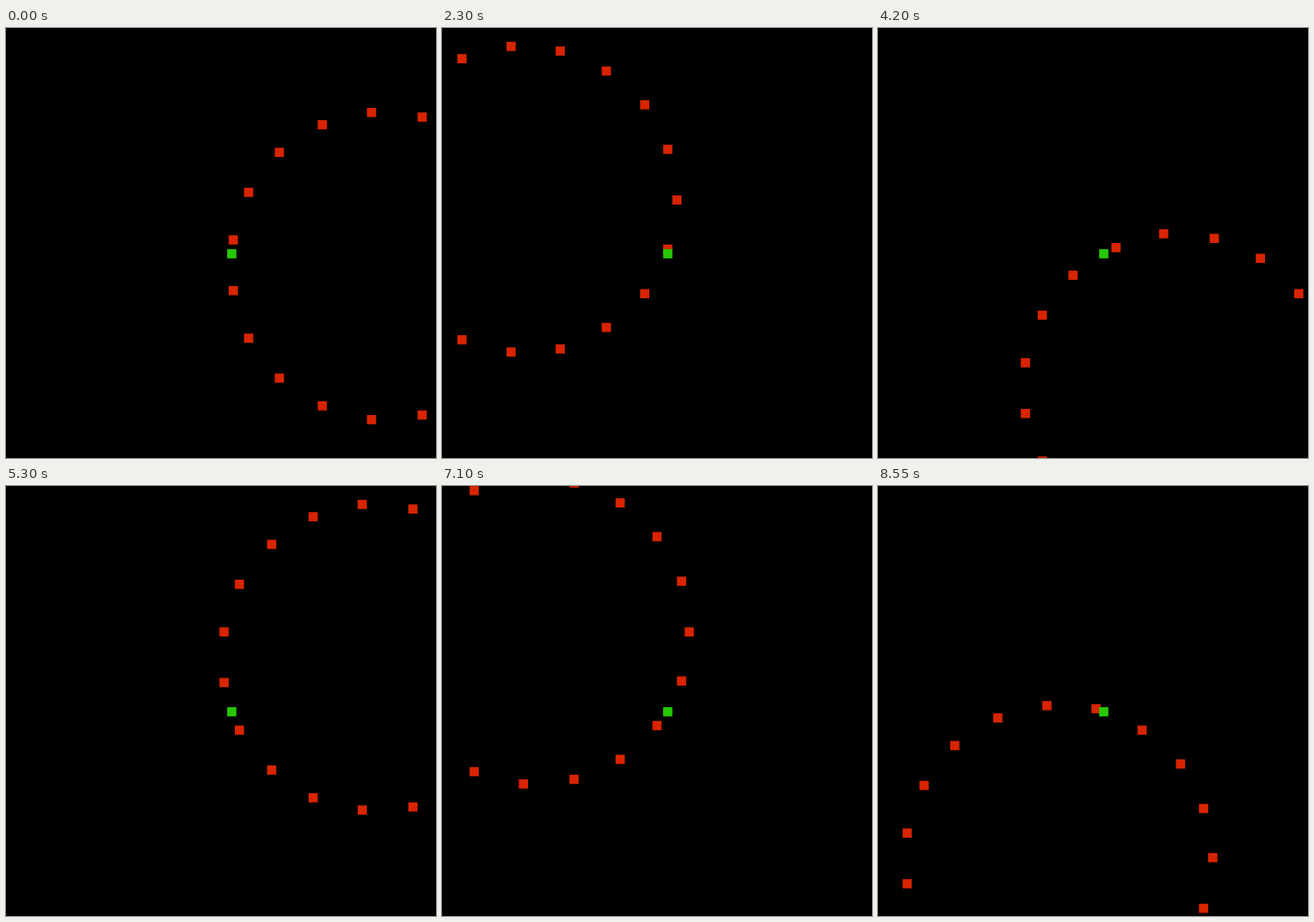
An HTML page with a canvas for the animation above (8600 ms loop, 500x500 px).

```html
<!DOCTYPE html>
<html lang="en">
<head>
<meta charset="utf-8">
<title>Orbiting ring</title>
<style>
  html, body { margin: 0; width: 100%; height: 100%; overflow: hidden; background: #000; }
  canvas { display: block; width: 500px; height: 500px; }
</style>
</head>
<body>
<canvas id="stage" width="500" height="500"></canvas>
<script>
const ctx = document.getElementById('stage').getContext('2d');
const LOOP = 8600, STEP = 50;
const SCALE = 500 / 280;             // the scene is laid out on a 280-unit grid
const PIVOT = 147, RADIUS = 100, DOTS = 19, SIZE = 6;

// [time in ms, angle in degrees] of the ring's centre around the pivot
const turns = [
  [0, 4.8], [900, -57.2], [1100, -70.9], [2300, -159.6], [4200, -298.8],
  [4500, -322.2], [6300, -452.9], [6350, -456], [7200, -515.7],
  [7800, -557.9], [8100, -581.5], [8550, -613.3]
];

function angleAt(time) {
  const next = Math.max(1, turns.findIndex(([t]) => t >= time));
  const [t0, a0] = turns[next - 1];
  const [t1, a1] = turns[next];
  return (a0 + (a1 - a0) * (time - t0) / (t1 - t0)) * Math.PI / 180;
}

function dot(x, y, color) {
  ctx.fillStyle = color;
  ctx.fillRect(Math.floor(x) - SIZE / 2, Math.floor(y) - SIZE / 2, SIZE, SIZE);
}

function draw(time) {
  const turn = angleAt(time);
  const cx = PIVOT + RADIUS * Math.cos(turn);
  const cy = PIVOT + RADIUS * Math.sin(turn);
  ctx.setTransform(1, 0, 0, 1, 0, 0);
  ctx.fillStyle = '#000';
  ctx.fillRect(0, 0, 500, 500);
  ctx.scale(SCALE, SCALE);
  for (let i = 0; i < DOTS; i++) {
    const a = i * 2 * Math.PI / DOTS;
    dot(cx + RADIUS * Math.cos(a), cy + RADIUS * Math.sin(a), '#d82400');
  }
  dot(PIVOT, PIVOT, '#24c800');
}

const start = performance.now();
function frame() {
  const time = (performance.now() - start) % LOOP;
  draw(Math.floor(time / STEP) * STEP);
  requestAnimationFrame(frame);
}
frame();
</script>
</body>
</html>
```
